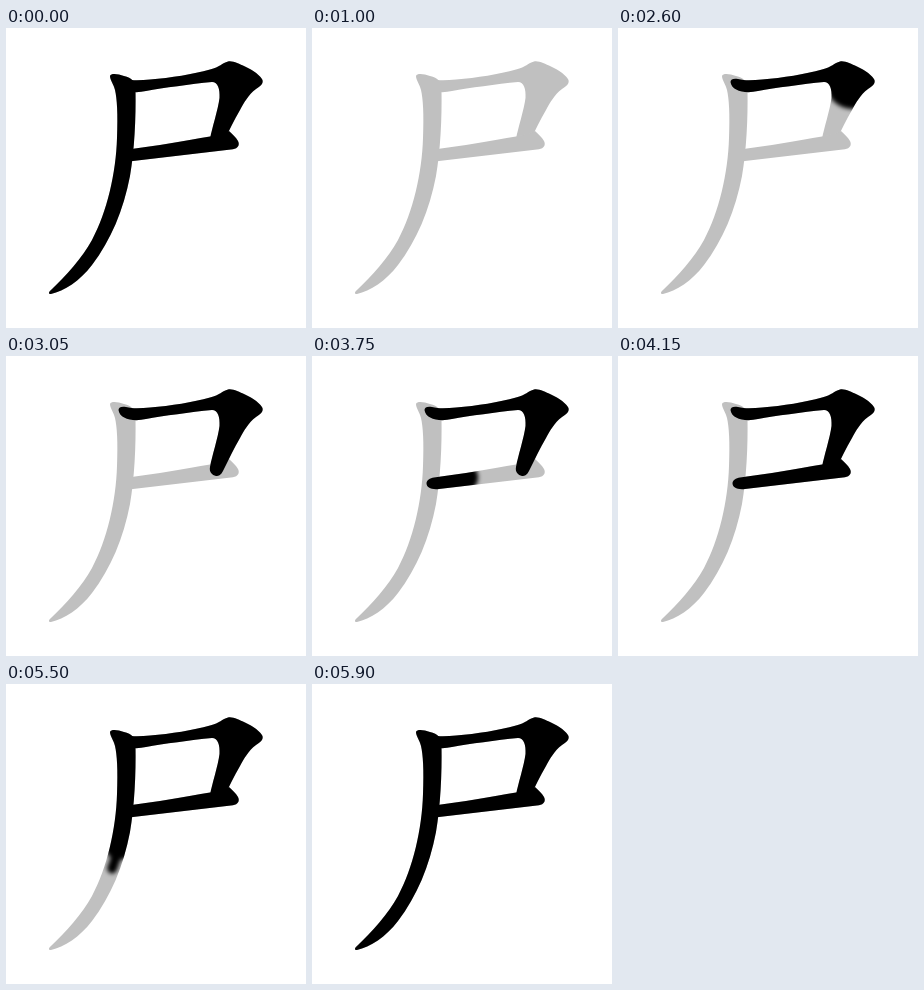
Recreate the animation shown at these times as an HTML page. Size 300x300 px, loop 6900 ms.

```html
<!DOCTYPE html>
<html lang="zh">
<head>
<meta charset="utf-8">
<title>Stroke order</title>
<style>
  html, body { margin: 0; width: 100%; height: 100%; overflow: hidden; background: #fff; }
  svg { display: block; width: 100%; height: 100%; }

  .brush path {
    fill: none;
    stroke: #fff;
    stroke-linecap: round;
    stroke-linejoin: round;
    stroke-dasharray: 100 300;
    animation: 6900ms step-end infinite;
  }
  /* offset 0 = fully inked, 120 = no ink; each burst jumps every 100 ms */
  .brush .top { animation-name: top; stroke-width: 26px; }
  .brush .turn { animation-name: turn; stroke-width: 52px; }
  .brush .bar { animation-name: bar; stroke-width: 28px; }
  .brush .fall { animation-name: fall; stroke-width: 30px; }
  .brush .tip { stroke-width: 10px; }

  @keyframes top {
    0% { stroke-dashoffset: 0; }
    14.49% { stroke-dashoffset: 120; }
    25.35% { stroke-dashoffset: 103; animation-timing-function: steps(2, start); }
    28.26% { stroke-dashoffset: 89; }
    28.98% { stroke-dashoffset: 89; animation-timing-function: steps(7, start); }
    39.13%, 100% { stroke-dashoffset: 0; }
  }
  @keyframes turn {
    0% { stroke-dashoffset: 0; }
    14.49% { stroke-dashoffset: 120; }
    37.68% { stroke-dashoffset: 88; }
    39.85% { stroke-dashoffset: 88; animation-timing-function: steps(4, start); }
    45.65%, 100% { stroke-dashoffset: 0; }
  }
  @keyframes bar {
    0% { stroke-dashoffset: 0; }
    14.49% { stroke-dashoffset: 120; }
    51.44% { stroke-dashoffset: 106; animation-timing-function: steps(7, start); }
    61.59%, 100% { stroke-dashoffset: 0; }
  }
  @keyframes fall {
    0% { stroke-dashoffset: 0; }
    14.49% { stroke-dashoffset: 120; }
    67.39% { stroke-dashoffset: 100; animation-timing-function: steps(3, start); }
    71.73% { stroke-dashoffset: 93; }
    72.46% { stroke-dashoffset: 93; animation-timing-function: steps(7, start); }
    82.6% { stroke-dashoffset: 34; animation-timing-function: steps(3, start); }
    86.95%, 100% { stroke-dashoffset: 0; }
  }
</style>
</head>
<body>
<svg viewBox="0 0 300 300">
  <defs>
    <path id="s1" d="M112.500 54C112.500 51 116 50 120 51C128 53 136 52 144 51.500C165 50 187 46 204 41.500C214 39 216 35 222 33.500C227 32.500 233 36 239 38.500C247 42 255 48 256.500 52C257.500 56 254 58.500 250 61C242 67 238 75 234 82C228 92 223 103 217 115C215 119 213 120 210 120C206 119 203 116 204 111C206 100 212 82 213.500 70C214 61 212 54 206 54C185 56 157 60 140 63C127 66 113.500 63 112.500 54Z"/>
    <path id="s2" d="M114.500 127.500C114.500 124 118 122 122 121.500C150 118 180 112.500 204 108.500C212 107 219 106 223 103C226 106 230 109 232 113C234 117 232 120.500 227 121.200L127 133C119 134 114.500 131 114.500 127.500Z"/>
    <path id="s3" d="M104 48C105 45 112 46 118 48C126 50 129.500 53 129.500 62C130 90 128.500 122 124 148C117.500 182 105 212 86 237C74 253 58 263 45 266C42 266 42.500 264 45 262C60 248 76 230 86 212C101 184 110 145 111 110C112 85 111 71 109 62C107.500 56 104 52 104 48Z"/>
    <filter id="soft" filterUnits="userSpaceOnUse" x="0" y="0" width="300" height="300" color-interpolation-filters="sRGB">
      <feGaussianBlur stdDeviation="2.2"/>
    </filter>
    <mask id="m1" maskUnits="userSpaceOnUse" x="0" y="0" width="300" height="300">
      <g class="brush" filter="url(#soft)">
        <path class="top" pathLength="100" d="M106 57L140 56L250 40"/>
        <path class="turn" pathLength="100" d="M237 48L212 106"/>
      </g>
    </mask>
    <mask id="m2" maskUnits="userSpaceOnUse" x="0" y="0" width="300" height="300">
      <g class="brush" filter="url(#soft)">
        <path class="bar" pathLength="100" d="M104 128L226 112"/>
      </g>
    </mask>
    <!-- a wide brush follows a thin one, giving a pointed front -->
    <mask id="m3" maskUnits="userSpaceOnUse" x="0" y="0" width="300" height="300">
      <g class="brush" filter="url(#soft)">
        <path class="fall" pathLength="100" d="M92 20L119 52C122 90 122 150 103 192C92 216 76 238 58 256"/>
        <path class="fall tip" pathLength="100" d="M107 38L119 52C122 90 122 150 103 192C90 220 68 249 37 271"/>
      </g>
    </mask>
  </defs>
  <g fill="#c0c0c0">
    <use href="#s1"/><use href="#s2"/><use href="#s3"/>
  </g>
  <g mask="url(#m1)"><use href="#s1"/></g>
  <g mask="url(#m2)"><use href="#s2"/></g>
  <g mask="url(#m3)"><use href="#s3"/></g>
</svg>
</body>
</html>
```
